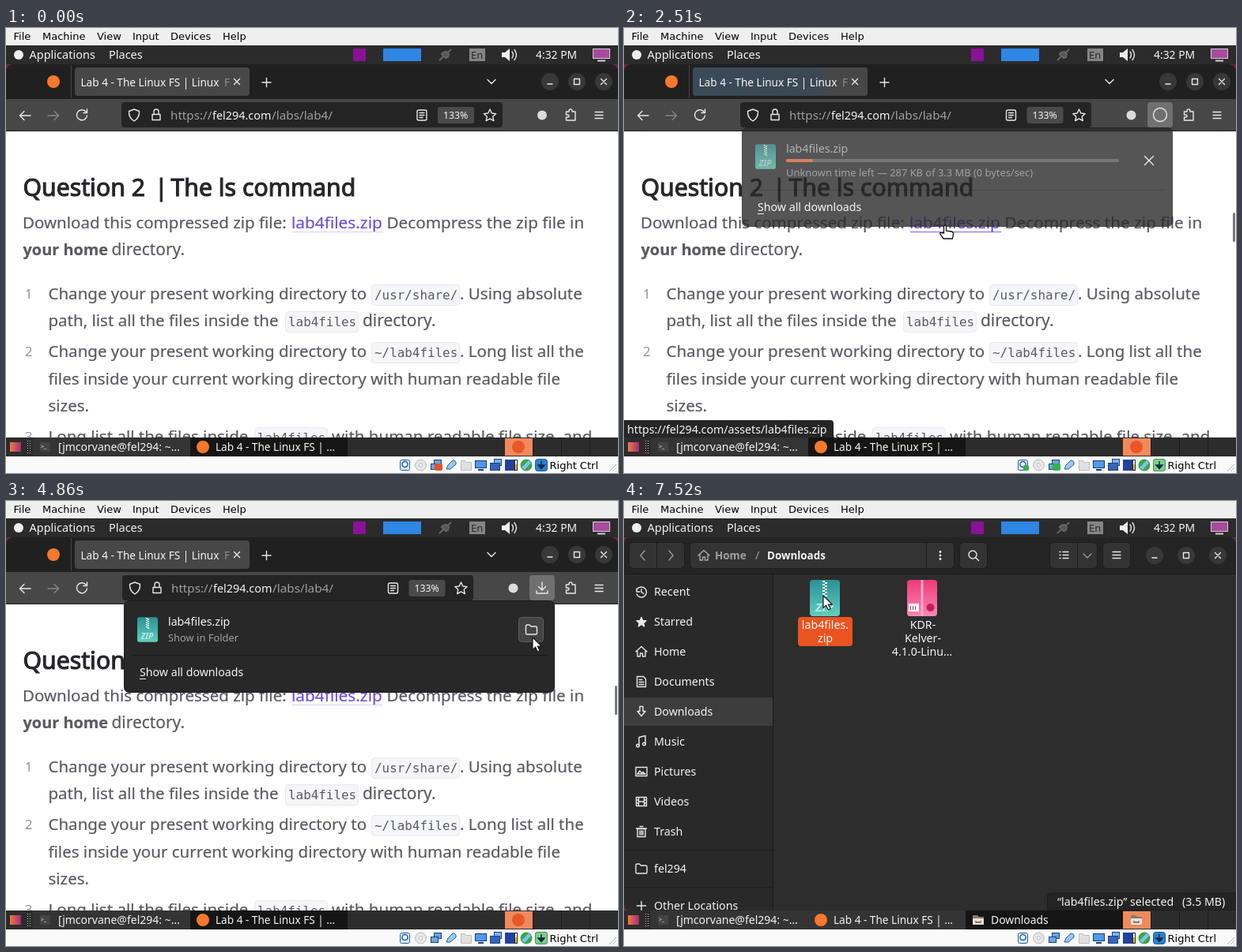
An HTML page for the animation above (8 s loop, 774 by 564 pixels).

```html
<!DOCTYPE html>
<html lang="en">
<head>
<meta charset="utf-8">
<title>Downloading a zip file</title>
<style>
html, body { margin: 0; width: 100%; height: 100%; overflow: hidden; background: #2b2b2b; }
svg { display: block; width: 774px; height: 564px; }
text { font: 14.2px "Noto Sans", "Open Sans", sans-serif; fill: #f4f4f4; white-space: pre; }
.qt text { font: 13px "DejaVu Sans", sans-serif; fill: #000; }
.page text { font-size: 20.5px; fill: #5c5962; stroke: #5c5962; stroke-width: .2px; }
.page .h { font-size: 30.2px; fill: #27262b; stroke: #27262b; stroke-width: 1.1px; }
.page .b { font-size: 19.9px; font-weight: 700; }
.page .n { font-size: 16.5px; fill: #959396; stroke: none; }
.page .link { font-size: 20.8px; fill: #6f4fd8; stroke: #6f4fd8; }
.page .wide { font-size: 20.9px; }
.page .code { font: 15.9px "DejaVu Sans Mono", monospace; stroke: none; }
.page .box { fill: #f5f6fa; stroke: #e9e8ee; }
text.sm { font-size: 12.9px; fill: #a2a2a2; }
text.dim { fill: #a0a0a0; }
text.tab { font-size: 13.6px; }
text.bold { font-weight: 700; font-size: 13.4px; }
text.mid { text-anchor: middle; }
.ic { fill: none; stroke: #e8e8e8; stroke-width: 1.4; stroke-linecap: round; stroke-linejoin: round; }
.btn { fill: #333; stroke: #1c1c1c; }
</style>
</head>
<body>
<svg viewBox="0 0 774 564">
<defs>
  <linearGradient id="teal" x2="0" y2="1"><stop stop-color="#2c9093"/><stop offset="1" stop-color="#5fcfc0"/></linearGradient>
  <linearGradient id="pink" x2="0" y2="1"><stop stop-color="#ee3a78"/><stop offset="1" stop-color="#fb86b4"/></linearGradient>
  <linearGradient id="desk" x2="1"><stop stop-color="#f07a3c"/><stop offset="1" stop-color="#a22f78"/></linearGradient>
  <linearGradient id="load" x2="1"><stop stop-color="#3a4a58"/><stop offset=".7" stop-color="#3b4854"/><stop offset=".8" stop-color="#474747"/></linearGradient>
  <clipPath id="win"><rect y="46" width="774" height="473"/></clipPath>
  <symbol id="zip" viewBox="0 0 38 46">
    <rect width="38" height="46" rx="4" fill="url(#teal)"/>
    <path d="M17.5 1v20M20.5 3v18" stroke="#fff" stroke-width="3" stroke-dasharray="2 2"/>
    <text x="7" y="40" style="font-size:15px;font-weight:700;font-style:italic;fill:#b9ece4">ZIP</text>
  </symbol>
  <symbol id="folder" viewBox="0 0 16 14" overflow="visible">
    <path class="ic" d="M1 11.500V2.500Q1 1 2.500 1H5.500L7.500 3H13.500Q15 3 15 4.500V11.500Q15 13 13.500 13H2.500Q1 13 1 11.500Z"/>
  </symbol>
  <symbol id="cabinet" viewBox="0 0 16 14">
    <path d="M1 1h6l2 2h6v10H1z" fill="#8c7a6c"/><rect x="1" y="5" width="14" height="8" rx="1" fill="#e8e2dc"/><path d="M5 8v2h6V8" fill="none" stroke="#6b5b50" stroke-width="1.300"/>
  </symbol>
  <g id="pageTools">
    <rect x="546" y="100" width="46" height="21" rx="3" fill="#4a4a4a"/>
    <text x="553" y="115" style="font-size:12.3px">133%</text>
    <g class="ic">
      <rect x="520" y="104" width="12" height="13" rx="2"/><path d="M523 107.500h6M523 110.500h6M523 113.500h4"/>
      <path d="M612 103l2.300 5 5.400.6-4 3.700 1.100 5.300-4.800-2.700-4.800 2.700 1.100-5.300-4-3.700 5.400-.6z"/>
    </g>
    <circle cx="678" cy="110.500" r="6" fill="#dcdcdc"/>
  </g>
  <g id="address">
    <path class="ic" d="M162 103l6.500 2.500q.5 8.500-6.500 12.500-7-4-6.500-12.500zM185 109.500h10v7h-10zM187 109v-3a3 3 0 0 1 6 0v3"/>
    <text class="dim" x="208" y="116" style="font-size:15.200px">https://</text>
    <text x="261" y="116" style="font-size:14.400px">fel294.com</text>
    <text class="dim" x="336" y="116" style="font-size:15.300px">/labs/lab4/</text>
  </g>
</defs>

<rect width="774" height="564" fill="#2b2b2b"/>

<!-- Guest desktop panel -->
<g>
  <circle cx="16" cy="34" r="6" fill="#eee"/>
  <text x="29.500" y="39" style="font-size:14.500px">Applications</text>
  <text x="130" y="39" style="font-size:14.500px">Places</text>
  <rect x="439" y="26" width="16" height="16" fill="#8a1296"/>
  <rect x="477" y="26" width="48" height="16" fill="#2f86e4"/>
  <path d="M548 41l5-5m-2-3l5 5 3-1 1-4-3-3-4 1zm8-2l4-4" fill="#555" stroke="#666" stroke-width="2"/>
  <rect x="586" y="26" width="20" height="16" fill="#858585"/>
  <text x="588" y="38.500" style="font-size:13px;fill:#2b2b2b">En</text>
  <path d="M627 31h4l6-5v16l-6-5h-4z" fill="#f0f0f0"/>
  <path class="ic" d="M640 30q3 4 0 8M643 27.500q5 6.500 0 13"/>
  <text x="670" y="39" style="font-size:13.900px">4:32 PM</text>
  <rect x="742.500" y="26.500" width="21" height="12" fill="#a74c9c" stroke="#d5cdd5"/><path d="M748 41.500h10" stroke="#d5cdd5" stroke-width="2"/>
</g>

<rect y="46" width="774" height="473" fill="#6b2740"/>

<!-- Browser -->
<g data-t="0-5650" clip-path="url(#win)">
  <rect y="46" width="774" height="485" rx="9" fill="#202020"/>
  <circle cx="60" cy="68" r="8" fill="#f5782d"/>
  <path d="M82.500 47v42" stroke="#444"/>
  <rect x="87" y="50" width="221" height="36" rx="4" fill="#474747"/>
  <rect data-t="2120-2750" x="87" y="50" width="221" height="36" rx="4" fill="url(#load)"/>
  <text class="tab" x="94.500" y="74">Lab 4 - The Linux FS | Linux</text>
  <text class="tab" x="276" y="74" fill-opacity=".4">F</text>
  <path class="ic" d="M288.500 64.500l7 7m0-7l-7 7M324 69h11M329.500 63.500v11M609 65.500l5 5 5-5"/>
  <g fill="#383838"><circle cx="688" cy="68" r="11"/><circle cx="722" cy="68" r="11"/><circle cx="756" cy="68" r="11"/></g>
  <path class="ic" d="M685 71h6M718.500 64.500h7v7h-7zM752.500 64.500l7 7M759.500 64.500l-7 7"/>
  <rect y="90" width="774" height="40" fill="#474747"/>
  <path d="M0 130.500h774" stroke="#1d1d1d"/>
  <path class="ic" d="M31 111H18m5-5.500l-5.500 5.500 5.500 5.500M101 106a6.500 6.500 0 1 0 1.500 5M102.500 103v4.500H98M745 106.500h10M745 110.500h10M745 114.500h10"/>
  <path class="ic" style="stroke:#858585" d="M53 111h13m-5-5.500l5.500 5.500-5.500 5.500"/>
  <path class="ic" d="M708.500 106h3.500v-1a2 2 0 0 1 4 0v1h4v11h-11.500v-4h2a1.500 1.500 0 0 0 0-3h-2z"/>
  <g data-t="0-2280">
    <rect x="146" y="94" width="482" height="32" rx="4" fill="#242424"/>
    <use href="#pageTools"/><use href="#address"/>
  </g>
  <g data-t="2280-5650">
    <rect x="147" y="94" width="444" height="32" rx="4" fill="#242424"/>
    <use href="#pageTools" x="-36.500"/><use href="#address" x="1"/>
    <rect x="662" y="94" width="32" height="32" rx="4" fill="#707070"/>
    <circle data-t="2280-2910" class="ic" cx="678" cy="110" r="8.500"/>
    <circle data-t="2910-3290" class="ic" style="stroke:#b0653f" cx="678" cy="110" r="8.500"/>
    <path data-t="3290-5650" class="ic" d="M678 103v9.500m-4.500-4l4.500 4.500 4.500-4.500M671 114v3h14v-3"/>
  </g>

  <rect y="131" width="774" height="388" fill="#fff"/>
  <g class="page">
    <path d="M22 132.500h731" stroke="#e2e2e6"/>
    <text class="h" x="21.500" y="213">Question 2</text>
    <text class="h" x="188" y="213">|</text>
    <text class="h" x="208.500" y="213">The ls command</text>
    <text x="21" y="254">Download this compressed zip file:</text>
    <text class="link" x="361" y="254">lab4files.zip</text>
    <path d="M362 258.500h115" stroke="#d6d2ee"/>
    <path data-t="1730-2910" d="M362 258.500h115" stroke="#7d61dc"/>
    <text x="481.500" y="254" style="font-size:20.700px">Decompress the zip file in</text>
    <text class="b" x="21.500" y="288">your home</text>
    <text class="wide" x="133.500" y="288">directory.</text>
    <text class="n" x="24" y="343">1</text>
    <text x="53.500" y="344">Change your present working directory to</text>
    <rect class="box" x="462.500" y="325.500" width="111" height="26" rx="4"/>
    <text class="code" x="466" y="344">/usr/share/</text>
    <text x="574" y="344">. Using absolute</text>
    <text x="53.500" y="378">path, list all the files inside the</text>
    <rect class="box" x="353.500" y="359.500" width="92" height="26" rx="4"/>
    <text class="code" x="357" y="378">lab4files</text>
    <text class="wide" x="451" y="378">directory.</text>
    <text class="n" x="24" y="416">2</text>
    <text x="53.500" y="417">Change your present working directory to</text>
    <rect class="box" x="462.500" y="398.500" width="111" height="26" rx="4"/>
    <text class="code" x="466" y="417">~/lab4files</text>
    <text x="574" y="417">. Long list all the</text>
    <text x="53.500" y="452">files inside your current working directory with human readable file</text>
    <text x="53.500" y="486">sizes.</text>
    <text class="n" x="24" y="524">3</text>
    <text x="53.500" y="525">Long list all the files inside</text>
    <rect class="box" x="314.500" y="506.500" width="92" height="26" rx="4"/>
    <text class="code" x="318" y="525">lab4files</text>
    <text x="412" y="525">with human readable file size, and</text>
  </g>
  <rect data-t="330-5330" x="770" y="234" width="3" height="37" rx="1.500" fill="#77777b"/>
  <g id="hint" data-t="2040-2910">
    <path d="M0 497h261q4 0 4 4v18H0z" fill="#262626"/>
    <text x="4" y="514">https://fel294.com/assets/lab4files.zip</text>
  </g>

  <!-- Downloads panel -->
  <g id="panel" data-t="2360-5490">
    <g data-t="2360-3000">
      <rect x="149.500" y="126.500" width="544" height="125" rx="6" fill="#2a2a2a" stroke="#1c1c1c"/>
      <use href="#zip" x="166" y="147" width="26" height="32" opacity=".75"/>
      <text class="dim" x="205" y="158">lab4files.zip</text>
      <rect x="205" y="166" width="421" height="4" rx="2" fill="#555"/>
      <rect x="205" y="166" width="34" height="4" rx="2" fill="#d0622f"/>
      <text class="sm" x="205" y="188" style="fill:#8a8a8a">Unknown time left — 287 KB of 3.3 MB (0 bytes/sec)</text>
      <path class="ic" d="M658.500 162.500l11 11m0-11l-11 11"/>
      <path d="M159 205.500h525" stroke="#1d1d1d"/>
      <text x="169" y="232">Show all downloads</text><path d="M169 235.500h8" stroke="#eee"/>
    </g>
    <g data-t="3000-5490">
      <rect x="149.500" y="126.500" width="544" height="116" rx="6" fill="#282828" stroke="#1a1a1a"/>
      <rect data-t="3000-3690" x="159" y="136" width="525" height="55" rx="4" fill="#3c3c3c"/>
      <path d="M159 195.500h525" stroke="#1a1a1a"/>
      <g data-t="3000-3450">
        <use href="#zip" x="166" y="147" width="26" height="32" opacity=".7"/>
        <text class="dim" x="205" y="158">lab4files.zip</text>
        <text class="sm" x="205" y="178" style="fill:#858585">Open File</text>
      </g>
      <g data-t="3450-5490">
        <use href="#zip" x="166" y="147" width="26" height="32"/>
        <text x="205" y="158">lab4files.zip</text>
      </g>
      <text data-t="3450-3850" class="sm" x="205" y="178">Open File</text>
      <text data-t="3850-5490" class="sm" x="205" y="178">Show in Folder</text>
      <rect data-t="3850-5490" x="648.500" y="147.500" width="31" height="31" rx="4" fill="#444" stroke="#5e5e5e"/>
      <use href="#folder" x="656.500" y="156" width="16" height="14"/>
      <text x="169" y="222">Show all downloads</text><path d="M169 225.500h8" stroke="#eee"/>
    </g>
  </g>
</g>

<!-- File manager -->
<g data-t="5650-8000" clip-path="url(#win)">
  <rect y="46" width="774" height="473" rx="9" fill="#2d2d2d"/>
  <path d="M0 93h188v417q0 9 0 9H9q-9 0-9-9z" fill="#292929"/>
  <path d="M0 92V55q0-9 9-9h756q9 0 9 9v37z" fill="#242424"/>
  <path d="M0 92.500h774M188.500 93v426" stroke="#191919"/>
  <g class="btn">
    <rect x="6.500" y="52.500" width="70" height="33" rx="5"/><path d="M41.500 53v32"/>
    <rect x="83.500" y="52.500" width="334" height="33" rx="5"/><path d="M382.500 53v32"/>
    <rect x="424.500" y="52.500" width="35" height="33" rx="5"/>
    <rect x="538.500" y="52.500" width="60" height="33" rx="5"/><path d="M573.500 53v32"/>
    <rect x="605.500" y="52.500" width="35" height="33" rx="5"/>
  </g>
  <path class="ic" style="stroke:#999" d="M26 63l-5 6 5 6M57 63l5 6-5 6M581 67l5 5 5-5"/>
  <path class="ic" d="M618 64.500h10M618 68.500h10M618 72.500h10M444.500 71.500l4 4"/>
  <circle class="ic" cx="441" cy="68" r="5"/>
  <g fill="#eee"><circle cx="400" cy="64.500" r="1.400"/><circle cx="400" cy="69" r="1.400"/><circle cx="400" cy="73.500" r="1.400"/></g>
  <g transform="translate(0 1)">
    <g fill="#383838"><circle cx="671" cy="68" r="11"/><circle cx="711" cy="68" r="11"/><circle cx="751" cy="68" r="11"/></g>
    <path class="ic" d="M668 71h6M707.500 64.500h7v7h-7zM747.500 64.500l7 7M754.500 64.500l-7 7"/>
  </g>
  <g data-t="6110-8000">
    <rect y="249" width="188" height="36" fill="#3d3d3d"/>
    <path class="ic" style="stroke:#aaa" d="M94 69l7-6.500 7 6.500M96 68v7h3.500v-4h3v4h3.500v-7"/>
    <text class="bold dim" x="115" y="74">Home</text>
    <text class="dim" x="166" y="74">/</text>
    <text class="bold" x="181" y="74">Downloads</text>
    <path class="ic" d="M551 64.500h1M551 68.500h1M551 72.500h1M555 64.500h7M555 68.500h7M555 72.500h7"/>
    <use href="#zip" x="235" y="100" width="38" height="46"/>
    <rect data-t="7130-8000" x="220" y="147" width="69" height="37" rx="4" fill="#e95420"/>
    <text class="mid" x="254.500" y="161.500">lab4files.</text>
    <text class="mid" x="254.500" y="179">zip</text>
    <rect x="358" y="100" width="38" height="46" rx="4" fill="url(#pink)"/>
    <path d="M377 100v46" stroke="#fba9ca" stroke-width="3"/>
    <rect x="360" y="130" width="13" height="10" fill="#fff"/><path d="M362.500 133v5m3-5v5m3-5v5" stroke="#b33"/>
    <circle cx="387.500" cy="135" r="5" fill="#c01f55"/>
    <text class="mid" x="378" y="161.500">KDR-</text>
    <text class="mid" x="378" y="179">Kelver-</text>
    <text class="mid" x="377" y="196">4.1.0-Linu…</text>
    <g data-t="7130-8000">
      <path d="M535.500 519v-18q0-4 4-4H774v22z" fill="#242424" stroke="#1a1a1a"/>
      <text x="548" y="513">“lab4files.zip” selected</text><text x="706" y="513">(3.5 MB)</text>
    </g>
  </g>
  <g id="places"></g>
  <path d="M0 442.500h188M0 489.500h188" stroke="#1f1f1f"/>
  <use href="#folder" x="14" y="459" width="16" height="14"/>
  <text x="38" y="471">fel294</text>
  <text x="38" y="518">Other Locations</text>
  <g class="ic">
    <path d="M16 111v4h4M16.500 112a6.500 6.500 0 1 1-.5 6M22 111.500v4l3 2"/>
    <path fill="#e8e8e8" d="M22 147.500l1.700 4 4.300.3-3.300 2.800 1 4.200-3.700-2.300-3.700 2.300 1-4.200-3.300-2.800 4.300-.3z"/>
    <path d="M15 191l7-6.500 7 6.500M17 190v7h3.500v-4h3v4h3.500v-7"/>
    <path d="M16.500 222.500h8l3 3v10h-11zM19 226.500h4M19 229.500h6M19 232.500h6"/>
    <path d="M20 260.500h4v6h3l-5 6-5-6h3z"/>
    <path d="M19 309.500v-10l8-2v10"/><circle cx="17.500" cy="310" r="1.800"/><circle cx="25.500" cy="308" r="1.800"/>
    <path d="M15 337.500h14v11H15zM17 346l3-4 2.500 3 1.500-1.500 3 2.500z"/>
    <path d="M15.500 375.500h13v11h-13zM18.500 376v10M25.500 376v10M16 379h2M16 383h2M26 379h2M26 383h2M19 381h6"/>
    <path d="M17 415.500h10v10H17zM15.500 415h13M20 412.500h4M20 418v5M22 418v5M24 418v5"/>
    <path d="M22 507.500v11M16.500 513h11"/>
  </g>
</g>

<!-- Taskbar -->
<g>
  <rect y="519" width="774" height="24" fill="#2c2c2c"/>
  <rect x="5" y="525" width="14" height="12" fill="url(#desk)"/>
  <path d="M27.500 523v16M30.500 523v16" stroke="#bbb" stroke-dasharray="1 2"/>
  <rect x="34" y="519" width="199" height="24" fill="#343434"/>
  <rect x="43" y="525" width="13" height="12" rx="1" fill="#444"/><text x="44" y="533" style="font-size:7px">&gt;_</text>
  <text x="66" y="536" style="font-size:14px">[jmcorvane@fel294: ~…</text>
  <rect data-t="0-5650" x="233" y="519" width="199" height="24" fill="#151515"/>
  <rect data-t="5650-8000" x="233" y="519" width="199" height="24" fill="#343434"/>
  <circle cx="249" cy="531" r="8" fill="#f5782d"/>
  <text class="tab" x="265" y="536">Lab 4 - The Linux FS | …</text>
  <g data-t="5650-8000">
    <rect x="432" y="519" width="199" height="24" fill="#151515"/>
    <use href="#cabinet" x="440" y="524" width="16" height="14"/>
  </g>
  <text data-t="5650-6110" x="464" y="536">Loading…</text>
  <text data-t="6110-8000" x="464" y="536" style="font-size:13.900px">Downloads</text>
  <rect x="631" y="520" width="35" height="22" fill="#f08a5d"/>
  <path d="M666.500 519v24M702.500 519v24M738.500 519v24" stroke="#1d1d1d"/>
  <circle data-t="0-5650" cx="648" cy="531" r="8" fill="#e8562a"/>
  <use data-t="5650-8000" href="#cabinet" x="640" y="524" width="16" height="14"/>
</g>

<!-- Host window -->
<g class="qt">
  <rect width="774" height="22" fill="#efefef"/>
  <text x="9.500" y="15">File</text><text x="46" y="15">Machine</text><text x="115" y="15">View</text>
  <text x="160" y="15">Input</text><text x="208" y="15">Devices</text><text x="274" y="15">Help</text>
  <rect y="543" width="774" height="21" fill="#fafafa"/>
  <rect x="498.500" y="547.500" width="12" height="13" rx="2" fill="#dcebf8" stroke="#1e5fa8"/><circle cx="504.500" cy="553" r="3.500" fill="#fff" stroke="#1e5fa8" stroke-width="1.500"/>
  <rect data-t="2120-2830" x="505" y="554" width="7" height="7" rx="2" fill="#35b04a"/>
  <rect data-t="5490-6260" x="505" y="554" width="7" height="7" rx="2" fill="#e23b2e"/>
  <circle cx="524.500" cy="554" r="7" fill="#e6e6e6" stroke="#bbb"/><circle cx="524.500" cy="554" r="2" fill="#fff" stroke="#bbb"/>
  <g stroke="#14437e" fill="#6aa5e0"><rect x="541.500" y="547.500" width="9" height="7"/><rect x="537.500" y="552.500" width="9" height="7"/></g>
  <rect data-t="0-80" x="542" y="552" width="10" height="9" rx="2" fill="#e0532f"/>
  <rect data-t="2120-2830" x="542" y="552" width="10" height="9" rx="2" fill="#35b04a"/>
  <path d="M557 559l2-5 6-6q5 0 4 5l-7 6z" fill="#9cc8f0" stroke="#1f5f9e"/>
  <path d="M575.500 548.500h5l1 2h7v10h-13z" fill="#e0e0e0" stroke="#bdbdbd"/>
  <rect x="593.500" y="548.500" width="14" height="9" fill="#4f9be8" stroke="#123c78"/><path d="M597 560h7" stroke="#123c78" stroke-width="2"/>
  <rect x="617.500" y="546.500" width="9" height="8" fill="#7db4ea" stroke="#1b3f86"/><rect x="612.500" y="551.500" width="12" height="9" fill="#3766b8" stroke="#1b3f86"/>
  <rect x="631" y="547" width="12" height="14" fill="#23419a"/>
  <rect x="643.500" y="547.500" width="3" height="13" fill="#fff" stroke="#222"/><rect x="644" y="553" width="2" height="7" fill="#e3c63a"/>
  <circle cx="658" cy="554" r="7.500" fill="#3fa548"/><path d="M652 557l9-9 3 3-8 9z" fill="#7cc3ee"/>
  <rect x="669.500" y="546.500" width="15" height="15" rx="3" fill="#2f80cb" stroke="#1c5a98"/>
  <rect data-t="800-2910,3770-6340" x="669.500" y="546.500" width="15" height="15" rx="3" fill="#7fd08a" stroke="#3b9a4c"/>
  <path d="M677 549v5m-4 0h8l-4 4.500z" fill="#0c2c50" stroke="#0c2c50" stroke-width="1.500"/>
  <text x="687.500" y="559">Right Ctrl</text>
  <path d="M763 562l9-9m-5 9l5-5m-1 5l1-1" stroke="#b5b5b5"/>
</g>

<!-- Pointer, hot spot at 0,0 -->
<g id="pointer" data-t="330-8000">
  <path data-t="330-1700" d="M-3-8h2.500M.5-8H3M0-7.500v15M-3 8h2.500M.5 8H3" stroke="#222" stroke-width="1.300"/>
  <path data-t="1700-2910" d="M-1.500 9V1q0-2 1.500-2t1.500 2v5l7 1q2 .5 2 2.500l-1 6.500H-2l-4-5.500q-1-2.500 1.500-2z" fill="#fff" stroke="#111" stroke-width="1.300"/>
  <path data-t="2910-5490,6260-8000" d="M0 0v15.500l3.600-3.200 2.700 5.700 2.800-1.300-2.700-5.600h5z" fill="#fff" stroke="#1a1a1a" stroke-width="1.200"/>
  <g data-t="5490-6260">
    <path d="M0 0v14l9-5z" fill="#111" stroke="#eee" stroke-width=".6"/>
    <circle cx="9" cy="11" r="6.500" fill="#f4f4f4" stroke="#222"/><path d="M7 9.500l2 1.500 1.500-2" fill="none" stroke="#555"/>
  </g>
</g>
</svg>
<script>
const LOOP = 8000, STEP = 78.2;
const $ = id => document.getElementById(id);

$('places').innerHTML = ['Recent', 'Starred', 'Home', 'Documents', 'Downloads', 'Music', 'Pictures', 'Videos', 'Trash']
  .map((name, i) => `<text x="38" y="${120 + 38 * i}">${name}</text>`).join('');

const timed = [...document.querySelectorAll('[data-t]')].map(el => ({
  el, spans: el.dataset.t.split(',').map(s => s.split('-').map(Number))
}));

// Pointer stops: time, x, y
const path = [
  [330, 121, 278], [480, 279, 270], [800, 279, 270], [1580, 385, 282],
  [1730, 398, 256], [1880, 405, 250], [2360, 405, 250], [2480, 406, 251],
  [2830, 406, 251], [3200, 257, 178], [3290, 257, 178], [3850, 652, 170],
  [4550, 666, 173], [5400, 666, 173], [5930, 352, 363], [6180, 352, 363],
  [6430, 276, 262], [6590, 270, 245], [7130, 248, 128], [7510, 252, 120]
];

function pointAt(t) {
  const i = path.findIndex(p => p[0] > t);
  if (i < 0) return path[path.length - 1].slice(1);
  if (i === 0) return path[0].slice(1);
  const [t0, x0, y0] = path[i - 1], [t1, x1, y1] = path[i];
  const u = (t - t0) / (t1 - t0), k = u * u * (3 - 2 * u);
  return [x0 + (x1 - x0) * k, y0 + (y1 - y0) * k].map(Math.round);
}

const ramp = (t, from, span) => Math.min(1, Math.max(0, (t - from) / span));

function draw(t) {
  for (const { el, spans } of timed) {
    const on = spans.some(([a, b]) => t >= a && t < b);
    el.style.display = on ? '' : 'none';
  }
  const held = 2040 + Math.floor((t - 2035) / STEP) * STEP;
  $('pointer').setAttribute('transform', `translate(${pointAt(held)})`);
  $('panel').style.opacity = ramp(t, 2360, 190);
  $('hint').style.opacity = ramp(t, 1930, 160);
}

const start = performance.now();
function tick(now) {
  draw(Math.max(0, now - start) % LOOP);
  requestAnimationFrame(tick);
}
draw(0);
requestAnimationFrame(tick);
</script>
</body>
</html>
```
